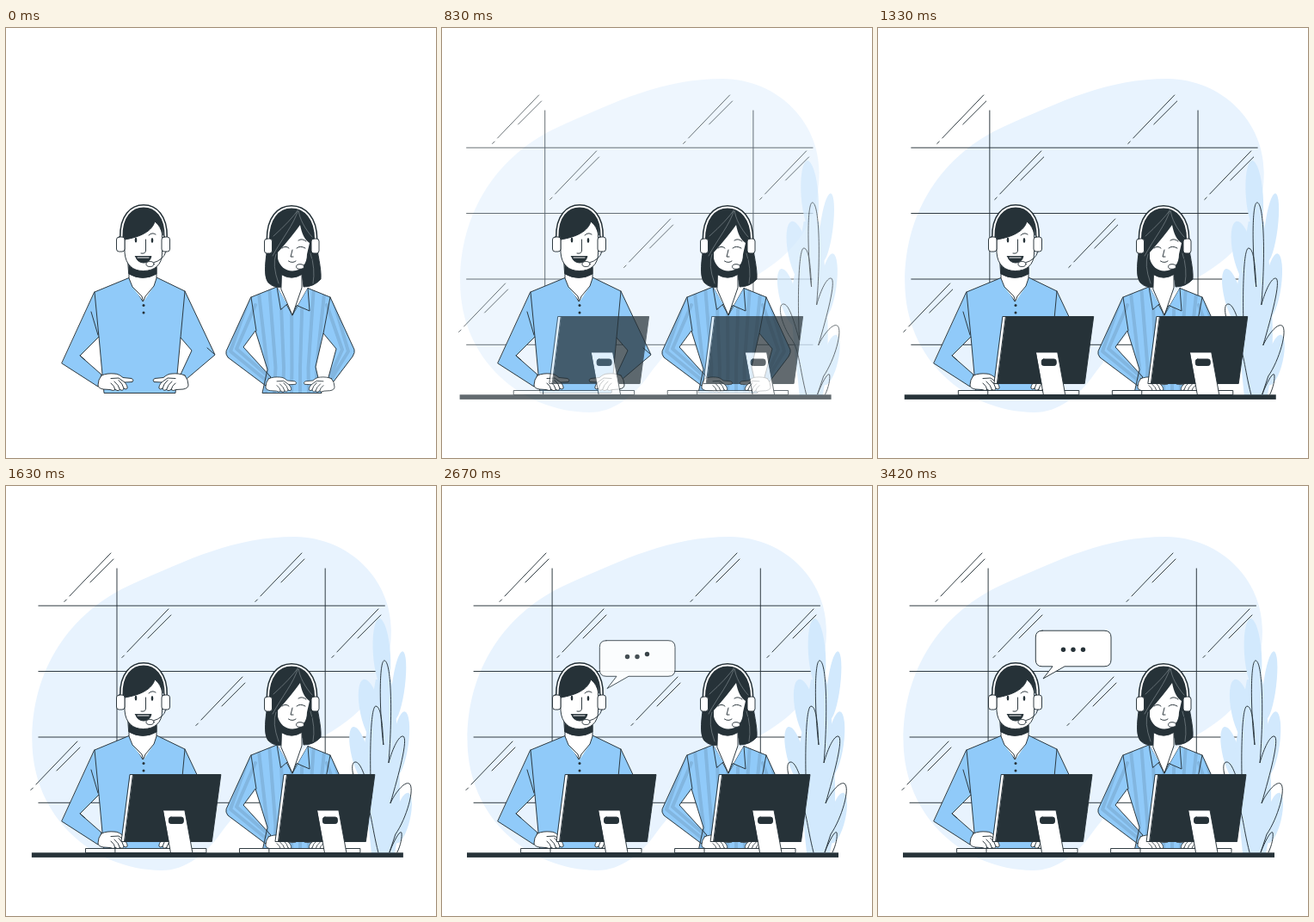
An HTML page that plays this animation: 500 px wide and 500 px high, repeating every 3.46 s.

```html
<!DOCTYPE html>
<html lang="en">
<head>
<meta charset="utf-8">
<title>Support desk</title>
<style>
  html, body { margin: 0; width: 100%; height: 100%; overflow: hidden; background: #fff; }
  svg { display: block; width: 100vw; height: 100vh; }
  .ink { stroke: #263238; stroke-width: .95; stroke-linecap: round; stroke-linejoin: round; fill: none; }
  .skin { fill: #fff; }
  .shirt { fill: #90caf9; }
  .dark { fill: #263238; }
  .leaf { fill: #d2e9fd; }
  .plain { stroke: none; }
  .stripe { fill: none; stroke: #82b6e0; stroke-width: 4; }
  .hairline { stroke: #8d979c; stroke-width: .6; }
  .band { stroke-width: 5; }
  .band + .band { stroke: #fff; stroke-width: 1.9; }
</style>
</head>
<body>
<svg viewBox="0 0 500 500">
  <defs>
    <path id="glint" d="M73 128L121 78M97 112L124 85M67 134.5L69.5 132"/>
    <g id="hand" class="ink">
      <path class="skin" d="M111 404C115 402 121 401.5 126 402C130 402 133 404 136 406.5L146 407.5Q149.5 409 147 411.5L138 412C140 414 141.5 417 141 419Q139.5 421 137 419Q136 422.5 132.500 420.5Q130.500 423 127 420.5Q125 422.500 121 420.500L113 420Q107 419 107 415Q107 409 111 404Z"/>
      <path d="M138 412L131 407L122 407.500M137 419Q136 414 131 409.500M132.500 420.500Q131 415 126 411M127 420.500Q126 416 122 413"/>
    </g>
    <g id="workstation" class="ink">
      <path class="skin" d="M92 421.5H232V426.5H92ZM126 421.5V426.5"/>
      <path class="skin" d="M143.500 335.5H148L138 413.5H133.500Z"/>
      <path class="dark" d="M147 335.5H249L238.500 413.5H137Z"/>
      <path class="skin" d="M182 377H207L216 426.5H191Z"/>
      <rect class="dark" x="188.5" y="385" width="17" height="7.5" rx="2.5"/>
    </g>
    <path id="blouse" d="M285 313L315 301L333 334L351 302.5L377 313L405 374Q406 377 403 382L381 411L375 406L384 373L369 355L360 394L367 424.5H298L304 397L290 352L276 371L308 406L302 416L258 383Q255 379 256 376Z"/>
    <clipPath id="blouseClip"><use href="#blouse"/></clipPath>
    <path id="manBand" d="M134.500 243C134 219 146 207.5 160 207.5C174 207.5 186 219 185.500 243"/>
    <path id="womanBand" d="M305 246C305 221 317 208.500 332 208.500C347 208.500 360 221 360 246"/>
  </defs>

  <path class="slide" fill="#e8f3fe" d="M29.500 296C29 215 72 147 146 114C212 85 265 59 335 59C400 60 447 110 447 168C447 225 420 262 370 290C310 325 275 370 250 402C232 428 208 447 180 447C100 446 30 385 29.500 296Z"/>

  <g class="slide ink">
    <path d="M37 139.2H439.500M37 215.5H439.500M37 292H439.500M37 368.3H439.500M128.100 96V368M370.300 96V368"/>
    <use href="#glint"/>
    <use href="#glint" x="67" y="65"/>
    <use href="#glint" x="222"/>
    <use href="#glint" x="311" y="65"/>
    <use href="#glint" x="153" y="144"/>
    <use href="#glint" x="-39" y="219"/>
  </g>

  <g class="slide">
    <g class="leaf">
      <ellipse cx="436" cy="195" rx="10" ry="41" transform="rotate(-4 436 195)"/>
      <ellipse cx="455.500" cy="232" rx="7.500" ry="40" transform="rotate(7 455.500 232)"/>
      <ellipse cx="423" cy="262" rx="12" ry="38" transform="rotate(-12 423 262)"/>
      <ellipse cx="457.500" cy="300" rx="9.500" ry="38" transform="rotate(8 457.500 300)"/>
      <ellipse cx="411" cy="313" rx="10" ry="34" transform="rotate(-14 411 313)"/>
      <ellipse cx="460" cy="386" rx="9" ry="30" transform="rotate(13 460 386)"/>
      <path d="M424 427C421 390 413 350 416 300L429 225H447L452 260C458 330 460 390 451 427Z"/>
    </g>
    <path class="ink" d="M432 426C424 395 424 375 415 362C403 345 398 322 405 321C412 320 418 342 424 363C422 330 422 257 429 256C436 256 437 282 438 301C433 260 433 203 439 203C447 203 449 262 444 322C449 304 456 290 461 291C467 294 456 335 446 369C451 358 462 343 468 346C475 351 465 386 452 405L445 426C450 413 457 400 459 403C460 408 458 418 454 426"/>
  </g>

  <!-- man -->
  <g class="ink">
    <path class="shirt" d="M103 307L143 290.5L159 318L175 290L208 306L243 380L210 408L202 405L216 375L203 360L197 424.5H114L108 359L86 381L111 403L107 417L65 390Z"/>
    <path class="skin plain" d="M143 270H175V291L172 300L160 318L147 301L143 291Z"/>
    <path d="M143 278V291L147 301L158 312L159.500 318L162 312L172 300L175 291V278"/>
    <path d="M103 307L108 359M208 306L203 360M99 330L107 357M86 381L92 386M234 372L242 379"/>
    <circle class="dark plain" cx="160" cy="322.500" r="1.500"/>
    <circle class="dark plain" cx="160" cy="331" r="1.500"/>
    <path class="dark" d="M142 271H175V286Q159 295 143 286Z"/>
    <path class="skin" d="M138 235V261C139 275 147 282.500 159.500 282.500C173 282.500 181.500 275 181.500 262V235C178 205 142 205 138 235Z"/>
    <path class="dark" d="M138 246C134 225 145 208 160 208C176 208 184 222 182 241Q180 230 173 225C170 236 157 243 138 246Z"/>
    <path d="M162.500 246V259Q162 263 157 262M166 241Q170 237 174 240"/>
    <ellipse class="dark plain" cx="151" cy="246.500" rx="1.300" ry="3"/>
    <ellipse class="dark plain" cx="170" cy="247" rx="1.300" ry="3"/>
    <path class="dark" d="M150.500 265.5H169Q167 273 160 273Q153 273 150.500 265.5Z"/>
    <path stroke="#fff" d="M153 267H166"/>
    <use href="#manBand" class="band"/>
    <use href="#manBand" class="band"/>
    <rect class="skin" x="128.500" y="243" width="9.500" height="17" rx="3"/>
    <rect class="skin" x="181" y="243" width="9.500" height="17" rx="3"/>
    <path d="M186 260Q183 270 171 273"/>
    <ellipse class="skin" cx="167.500" cy="274.500" rx="4.500" ry="3"/>
  </g>
  <use href="#hand"/>
  <use href="#hand" transform="translate(319 0) scale(-1 1)"/>

  <!-- woman -->
  <g class="ink">
    <use href="#blouse" class="shirt plain"/>
    <g clip-path="url(#blouseClip)">
      <path id="stripes" class="stripe"/>
      <path class="stripe" d="M282 316L261 376L304 411M290 322L268 373L306 406M381 318L398 376L379 407M373 322L391 374L377 405"/>
    </g>
    <use href="#blouse"/>
    <path d="M285 313L291 352M377 313L369 355"/>
    <path class="dark" d="M332 208C312 209 306 228 304.500 250C302 270 299 288 305 296Q312 303 321 301L324 285H344L346 301Q358 301 366 292C367 280 362 262 360 245C358 224 350 208 332 208Z"/>
    <path class="skin" d="M321 276H344V302L333 334L320 304Z"/>
    <path class="dark" d="M320 274H345V286Q332 294 321 287Z"/>
    <path class="skin plain" d="M342 229Q332 243 316 261V268C318 277 325 282.500 333 282.500C344 282.500 350 274 350 263L353 250C347 246 344 239 342 229Z"/>
    <path class="shirt" d="M315 301L319.500 327.500L327 321M351 302.500L353 329L338 322.500L333 334"/>
    <path d="M321 256Q325 252.500 329 256M338 256Q342 252.500 348 256M340 247Q344 244 349 248M333 258L331 266H334M328.500 271Q333 274 337 271"/>
    <path class="hairline" d="M340 211C334 230 322 243 310 265M340 211Q331 224 311 242M340 211C341 222 348 234 356 243M314 263Q309 275 317 297M354 262Q360 280 357 297"/>
    <use href="#womanBand" class="band"/>
    <use href="#womanBand" class="band"/>
    <rect class="skin" x="300.500" y="245" width="9" height="17" rx="3"/>
    <rect class="skin" x="355" y="245" width="9" height="17" rx="3"/>
    <path d="M359 262Q356 273 346 276"/>
    <ellipse class="skin" cx="342" cy="277.500" rx="4.500" ry="2.800"/>
  </g>
  <use href="#hand" transform="translate(208.900 56.300) scale(.87)"/>
  <use href="#hand" transform="translate(475.100 56.300) scale(-.87 .87)"/>

  <g class="slide">
    <use href="#workstation"/>
    <use href="#workstation" x="179"/>
    <rect class="dark" x="29" y="426.300" width="432" height="5.600"/>
  </g>

  <path id="bubble" class="ink skin" style="fill:#fff" d="M191 168.200H263Q271 168.200 271 176V202Q271 209.800 263 209.800H217L192 224L203 209.800H191Q183.300 209.800 183.300 202V176Q183.300 168.200 191 168.200Z"/>
  <circle class="dot dark" cx="215.500" cy="190.300" r="2.700"/>
  <circle class="dot dark" cx="227" cy="190.300" r="2.700"/>
  <circle class="dot dark" cx="238.500" cy="190.300" r="2.700"/>
</svg>
<script>
const LOOP = 3460, HALF = 1705;
const slides = document.querySelectorAll('.slide');
const dots = document.querySelectorAll('.dot');
const bubble = document.getElementById('bubble');

let stripes = '';
for (let i = 0; i < 7; i++) {
  stripes += `M${293 + i * 13} 300L${304 + i * 9.5} 395L${302 + i * 10} 426`;
}
document.getElementById('stripes').setAttribute('d', stripes);

// cubic-bezier easing, solved by bisection
function bezier(x1, y1, x2, y2) {
  const at = (a, b, t) => 3 * (1 - t) ** 2 * t * a + 3 * (1 - t) * t * t * b + t ** 3;
  return x => {
    if (x <= 0) return 0;
    if (x >= 1) return 1;
    let lo = 0, hi = 1;
    for (let i = 0; i < 24; i++) {
      const mid = (lo + hi) / 2;
      if (at(x1, x2, mid) < x) lo = mid; else hi = mid;
    }
    return at(y1, y2, lo);
  };
}
const ease = bezier(.36, -.01, .5, 1.38);
const rise = bezier(.7, 0, .45, 1.6);

function place(el, x, y, opacity) {
  el.setAttribute('transform', `translate(${x} ${y})`);
  el.setAttribute('opacity', Math.max(0, Math.min(1, opacity)));
}

function draw(now) {
  const t = now % LOOP;
  const p = ease(t / HALF);
  slides.forEach(el => place(el, -30 * (1 - p), 0, p));

  const u = (t - HALF) / HALF;
  place(bubble, 0, 48 * (1 - rise(u)), ease(u));
  dots.forEach((dot, i) => {
    const q = ease(i < 2 ? u : (t - 1780) / 1480);
    place(dot, 0, 59 * (1 - q), q);
  });
}

const start = performance.now();
function tick() {
  draw(performance.now() - start);
  requestAnimationFrame(tick);
}
tick();
</script>
</body>
</html>
```
